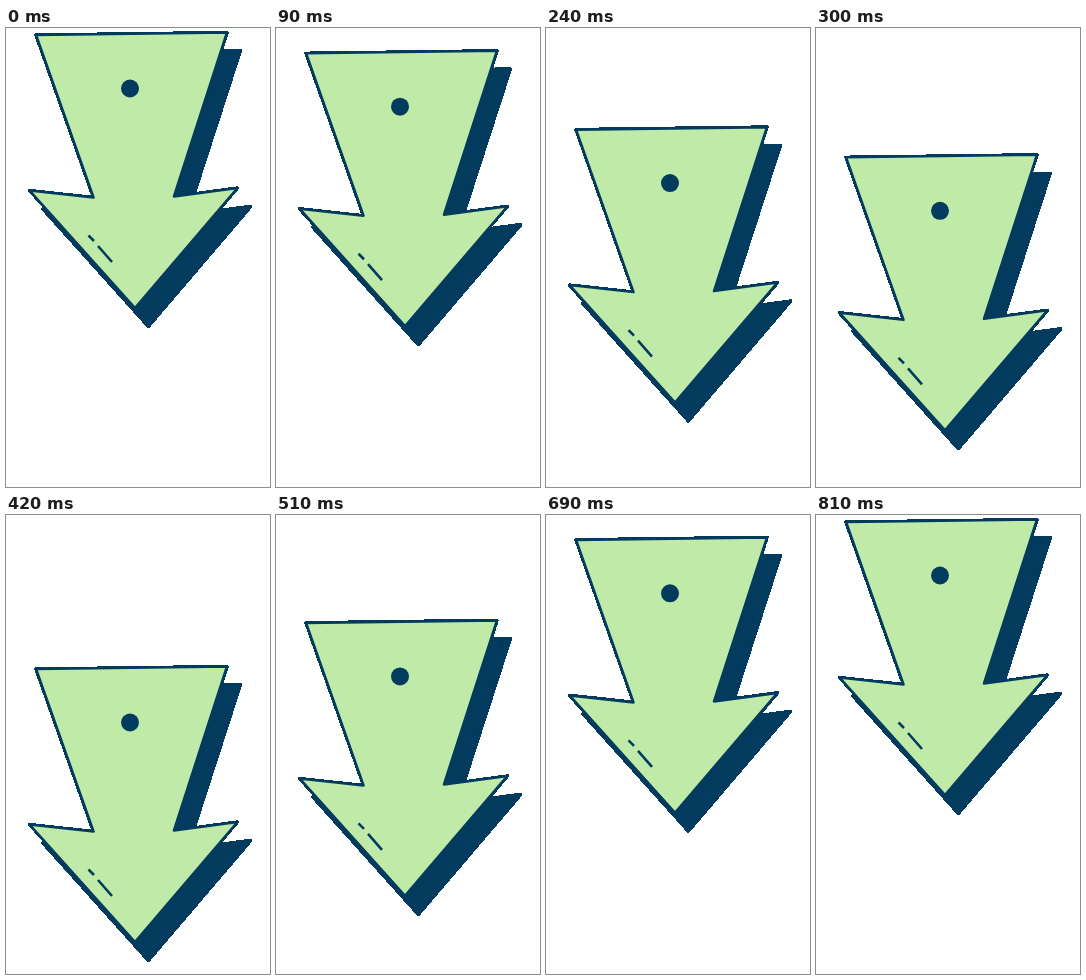
Animation, 264 px wide and 459 px high, one loop 840 ms. Source, as an HTML page with a canvas:

```html
<!DOCTYPE html>
<html lang="en">
<head>
<meta charset="utf-8">
<title>Bobbing arrow</title>
<style>
  html, body { margin: 0; width: 100%; height: 100%; overflow: hidden; background: #fff; }
  canvas { display: block; width: 264px; height: 459px; }
</style>
</head>
<body>
<canvas id="stage" width="264" height="459"></canvas>
<script>
const W = 264, H = 459;
const ctx = document.getElementById('stage').getContext('2d', { willReadFrequently: true });
const NAVY = '#033b5e';
const GREEN = '#c0eaa8';
const LOOP = 840, STEP = 30;
const TURN = 420, REST = 810, DROP = 147;

const arrow = new Path2D(
  'M30 7 L221 4.5 L168 168.5 L231.5 160 L129 280 L23.5 162.5 L87.5 169.5 Z');
const glints = new Path2D('M82.5 207.5 L88 213 M92 218 L106 234');

const cubic = (a, b, c, s) =>
  3 * a * s * (1 - s) ** 2 + 3 * b * s * s * (1 - s) + c * s ** 3;

// Bezier easing with flat ends; x1 and x2 are the handle positions in time.
function ease(x1, x2, u) {
  let low = 0, high = 1;
  for (let i = 0; i < 24; i++) {
    const mid = (low + high) / 2;
    if (cubic(x1, x2, 1, mid) < u) low = mid; else high = mid;
  }
  return cubic(0, 1, 1, (low + high) / 2);
}

function offsetAt(t) {
  if (t <= TURN) return DROP * ease(0.336, 0.606, t / TURN);
  const u = Math.min(1, (t - TURN) / (REST - TURN));
  return DROP * (1 - ease(0.107, 0.504, u));
}

function drawArrow(fill) {
  ctx.fillStyle = fill;
  ctx.fill(arrow);
  ctx.stroke(arrow);
}

// The silhouette has a hard edge: every touched pixel becomes opaque navy.
function hardenEdge() {
  const image = ctx.getImageData(0, 0, W, H);
  const px = image.data;
  for (let i = 0; i < px.length; i += 4) {
    const alpha = px[i + 3];
    if (alpha === 255) continue;
    px[i] = 3;
    px[i + 1] = 59;
    px[i + 2] = 94;
    px[i + 3] = alpha > 12 ? 255 : 0;
  }
  ctx.putImageData(image, 0, 0);
}

function draw(t) {
  ctx.clearRect(0, 0, W, H);
  ctx.save();
  ctx.translate(0, offsetAt(t));
  ctx.strokeStyle = NAVY;
  ctx.lineWidth = 2.6;
  ctx.lineJoin = 'round';

  ctx.save();
  ctx.translate(13.3, 18.4);
  drawArrow(NAVY);
  ctx.restore();

  drawArrow(GREEN);
  ctx.stroke(glints);

  ctx.fillStyle = NAVY;
  ctx.beginPath();
  ctx.arc(124, 60.5, 9, 0, Math.PI * 2);
  ctx.fill();
  ctx.restore();
  hardenEdge();
}

const start = performance.now();
let shown = -1;
function tick() {
  const t = (performance.now() - start) % LOOP;
  const step = Math.floor(t / STEP) * STEP;
  if (step !== shown) draw(shown = step);
  requestAnimationFrame(tick);
}
tick();
</script>
</body>
</html>
```
